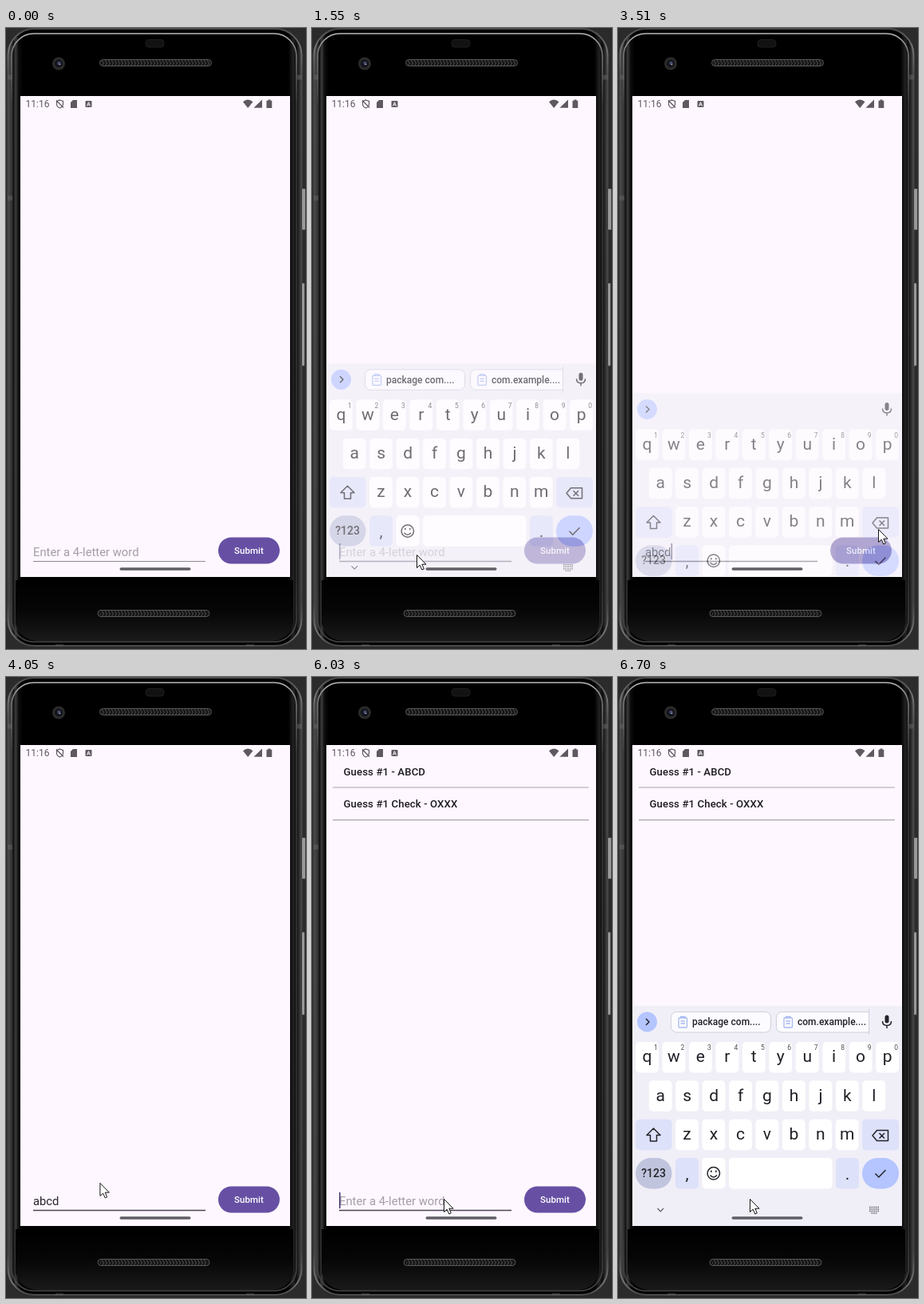
Recreate the animation shown at these times as an HTML page. Size 376x776 px, loop 8 s.

```html
<!DOCTYPE html>
<html lang="en">
<head>
<meta charset="utf-8">
<title>Word guessing app on a phone</title>
<style>
  html, body { margin: 0; width: 100%; height: 100%; overflow: hidden; background: #2b2b2b; }
  svg { display: block; font-family: Roboto, sans-serif; }
  .line { fill: none; stroke: #24242b; stroke-width: 1.5; stroke-linejoin: round; }
  .status { fill: #5d595f; }
  .row { font-size: 13.15px; font-weight: 500; letter-spacing: .0094em; fill: #1d1b20; }
  .field { font-size: 14.8px; }
  .letter { font-size: 21px; fill: #202027; }
  .digit { font-size: 8.5px; fill: #4c4c55; }
  .chip { font-size: 12px; font-weight: 500; fill: #202027; }
  .mid { text-anchor: middle; }
</style>
</head>
<body>
<svg width="376" height="776" viewBox="0 0 376 776">
  <defs>
    <linearGradient id="metal">
      <stop offset="0" stop-color="#4c4c4c"/>
      <stop offset=".012" stop-color="#363636"/>
      <stop offset=".018" stop-color="#101010"/>
      <stop offset=".026" stop-color="#3c3c3c"/>
      <stop offset=".036" stop-color="#0c0c0c"/>
      <stop offset=".05" stop-color="#000"/>
      <stop offset=".955" stop-color="#000"/>
      <stop offset=".972" stop-color="#222"/>
      <stop offset=".982" stop-color="#0c0c0c"/>
      <stop offset="1" stop-color="#484848"/>
    </linearGradient>
    <linearGradient id="rim" x2="0" y2="1">
      <stop offset="0" stop-color="#4a4a4a"/>
      <stop offset=".03" stop-color="#757575"/>
      <stop offset=".08" stop-color="#484848"/>
      <stop offset=".93" stop-color="#404040"/>
      <stop offset=".98" stop-color="#747474"/>
      <stop offset="1" stop-color="#4a4a4a"/>
    </linearGradient>
    <linearGradient id="shine" x2="0" y2="1">
      <stop offset="0" stop-color="#b8b8b8"/>
      <stop offset=".03" stop-color="#7a7a7a"/>
      <stop offset=".12" stop-color="#383838"/>
      <stop offset=".9" stop-color="#303030"/>
      <stop offset="1" stop-color="#484848"/>
    </linearGradient>
    <linearGradient id="foot" x2="0" y2="1">
      <stop offset="0" stop-color="#000"/>
      <stop offset=".5" stop-color="#060606"/>
      <stop offset="1" stop-color="#1a1a1a"/>
    </linearGradient>
    <pattern id="mesh" width="4" height="8" patternUnits="userSpaceOnUse">
      <path d="M0 0L2.500 4L0 8" fill="none" stroke="#505050"/>
    </pattern>
    <clipPath id="screen"><path d="M18 85H356V686H18Z"/></clipPath>
    <clipPath id="strip"><path d="M60 411H314V450H60Z"/></clipPath>
    <clipPath id="pill"><rect x="266" y="636.500" width="77" height="33" rx="16.500"/></clipPath>
  </defs>

  <g id="phone">
    <rect width="376" height="776" fill="#2b2b2b"/>
    <rect x="2.500" y="1" width="368" height="771" rx="33" fill="url(#metal)" stroke="url(#rim)" stroke-width="2"/>
    <path d="M12 690H360V745Q354 765 334 766H40Q18 765 12 745Z" fill="url(#foot)"/>
    <rect x="7" y="7" width="357" height="760" rx="28" fill="none" stroke="url(#shine)" stroke-width="1.600"/>
    <path d="M2 61.500H8M2 212.500H8M365 61.500H371" stroke="#666" stroke-width="6" opacity=".5"/>
    <path d="M62 771.500H72M301 771.500H311" stroke="#555" stroke-width="2"/>
    <g fill="#989898" stroke="#3a3a3a">
      <rect x="370.500" y="200.500" width="5" height="52" rx="1.500"/>
      <rect x="370.500" y="318.500" width="4" height="104" rx="1.500"/>
    </g>
    <rect x="175" y="14.500" width="23" height="9.500" rx="4" fill="#121212" stroke="#1d1d1d"/>
    <circle cx="66" cy="44.500" r="8" fill="#2b2b2b"/>
    <circle cx="66" cy="44.500" r="5" fill="#14141c"/>
    <circle cx="66.500" cy="44" r="2.200" fill="#454b6c"/>
    <circle cx="67.500" cy="45.500" r=".8" fill="#bbc"/>
    <g fill="#161616" stroke="#585858">
      <rect x="117.500" y="39.500" width="140" height="8" rx="4"/>
      <rect x="115" y="727.500" width="140" height="8" rx="4"/>
    </g>
    <path d="M120 40H255V47H120ZM118 728H252V735H118Z" fill="url(#mesh)"/>
  </g>

  <g clip-path="url(#screen)">
    <rect x="18" y="85" width="338" height="601" fill="#fef7ff"/>
    <g class="status">
      <text x="24.500" y="99.300" font-size="12">11:16</text>
      <path d="M67.500 90L71.500 91.500V95Q71.500 98.500 67.500 100Q63.500 98.500 63.500 95V91.500ZM63 90.500L72 99.500" fill="none" stroke="#5d595f" stroke-width="1.200"/>
      <path d="M84 90H89V100H81V93Z"/>
      <rect x="99.500" y="91" width="8" height="8" rx="1"/>
      <path d="M101.500 97.500L103.500 92.700L105.500 97.500M102.300 96H104.700" fill="none" stroke="#fef7ff"/>
      <path d="M297 92.200Q303 87 309.500 92.200L303.200 100Z"/>
      <path d="M321 89.500V99.800H310.500Z"/>
      <path d="M328.500 89.500H331.500V90.700H333.300V100H326.500V90.700H328.500Z"/>
    </g>

    <g id="guesses">
      <text class="row" x="39.500" y="123">Guess #1 - ABCD</text>
      <text class="row" x="39.500" y="163.300">Guess #1 Check - OXXX</text>
      <path d="M26 138H347M26 178.700H347" stroke="#aaa5ad" stroke-width="1.200"/>
    </g>

    <text id="entry" class="field" x="34" y="660"></text>
    <path id="underline" d="M34 666.500H250"/>
    <path id="caret" stroke="#4d426e" stroke-width="1.700"/>
    <rect x="266" y="636.500" width="77" height="33" rx="16.500" fill="#6750a4"/>
    <g clip-path="url(#pill)"><circle id="ripple" cx="300" cy="650" fill="#fff"/></g>
    <text class="mid" x="304.500" y="657.200" font-size="11.500" font-weight="500" letter-spacing=".08" fill="#fff">Submit</text>

    <g id="keyboard"></g>
    <rect x="142.500" y="674.200" width="89" height="3.500" rx="1.750" fill="#625e65"/>
  </g>

  <circle id="press" r="12" fill="#f8ec10" opacity=".66"/>
  <path id="pointer" d="M.5 .5V16.500L4.200 13.200L6.800 19L9.300 17.900L6.800 12.200H12Z" fill="#fff" stroke="#111"/>
</svg>

<script>
const $ = id => document.getElementById(id);
const clamp01 = v => Math.min(1, Math.max(0, v));
const show = (node, on) => node.setAttribute('visibility', on ? 'visible' : 'hidden');

// ---- keyboard ----
const PITCH = 33.45;
const key = (x, y, w, fill = '#fff', r = 5) =>
  `<rect x="${x}" y="${y}" width="${w}" height="38.5" rx="${r}" fill="${fill}"/>`;
const label = (cls, x, y, s) => `<text class="${cls} mid" x="${x}" y="${y}">${s}</text>`;
const line = (d, extra = '') => `<path class="line" d="${d}" ${extra}/>`;

function letterRow(letters, firstCenter, y, digits = '') {
  return [...letters].map((c, i) => {
    const x = firstCenter + i * PITCH;
    return key(x - 14.4, y, 28.8) + label('letter', x, y + 25.3, c) +
      (digits ? label('digit', x + 11, y + 10.3, digits[i]) : '');
  }).join('');
}

function chip(x, text) {
  return `<rect x="${x}" y="418.5" width="125" height="25.5" rx="7" fill="#fcfbff" stroke="#cfd0dc"/>
    <g fill="none" stroke="#a6baf0" stroke-width="1.3">
      <rect x="${x + 9.5}" y="426" width="10.5" height="12" rx="1"/>
      <path d="M${x + 12} 426V424.5H${x + 17.5}V426M${x + 12} 430H${x + 17.5}M${x + 12} 433H${x + 17.5}"/>
    </g>
    <text class="chip" x="${x + 26.5}" y="435.3">${text}</text>`;
}

const SOFT = '#dde1f9', BLUE = '#b4c5ff';
const dots = [0, 1, 2].map(r => `M315 ${662.5 + r * 2.5}H327`).join('');
$('keyboard').innerHTML = `
  <rect x="18" y="411" width="338" height="345" fill="#f0eff7"/>
  <circle cx="36.5" cy="431" r="12.5" fill="${BLUE}"/>
  ${line('M35 427L39 431L35 435')}
  <g id="chips"><g clip-path="url(#strip)">${chip(66.5, 'package com....')}${chip(198.5, 'com.example....')}</g>
    <path d="M314.5 415V447" stroke="#cfd0dc"/></g>
  <rect x="334.5" y="422.5" width="5" height="10" rx="2.5" fill="#24242b"/>
  ${line('M331.5 430Q331.5 435.5 337 435.5Q342.5 435.5 342.5 430M337 435.5V439')}
  ${letterRow('qwertyuiop', 36.5, 456, '1234567890')}
  ${letterRow('asdfghjkl', 53.2, 504.3)}
  ${key(22, 552.7, 45.5, SOFT)}${letterRow('zxcvbnm', 86.5, 552.7)}${key(306, 552.7, 46, SOFT)}
  ${line('M44.5 564L53 572.5H48.5V580H40.5V572.5H36Z')}
  ${line('M324.5 566.5H338.5V579.5H324.5L319 573ZM327.5 570L334 576.5M334 570L327.5 576.5')}
  ${key(22, 601, 45.5, '#c0c4dd', 19.2)}
  <text class="mid" x="44.5" y="625" font-size="14" font-weight="500" fill="#24242b">?123</text>
  ${key(72, 601, 29, SOFT)}${label('letter', 86.5, 628, ',')}
  ${key(105.5, 601, 29)}
  <circle class="line" cx="119.8" cy="620.3" r="7.7"/>
  ${line('M116.8 616.5V619M122.8 616.5V619M115.5 622.5Q119.8 627.5 124 622.5')}
  ${key(139, 601, 129.5)}
  ${key(273, 601, 29, SOFT)}${label('letter', 287.5, 628, '.')}
  ${key(306, 601, 46, BLUE, 19.2)}
  ${line('M322.5 620.5L326.8 625L335.5 616')}
  ${line('M49.5 664L53.3 667.8L57 664', 'style="stroke:#55555e;stroke-width:1.2"')}
  ${line(dots + 'M317.5 670H324.5', 'style="stroke:#66666e;stroke-dasharray:1.6 1"')}`;

// ---- timeline ----
const LOOP = 8000;

// Pointer stops: time, x, y. Repeated positions are rests.
const path = [
  [270, 209, 772], [500, 165, 712], [840, 131, 658], [2400, 131, 658],
  [2430, 142, 652], [2600, 250, 639], [2830, 320, 630], [3160, 320, 630],
  [3330, 326, 626], [3530, 326, 626], [3760, 165, 693], [3940, 56, 668],
  [4050, 117, 632], [4350, 240, 640], [4710, 299, 650], [5250, 299, 650],
  [5600, 250, 655], [5800, 167, 653], [5950, 167, 653], [6030, 165, 652], [LOOP, 165, 652]
];

// Smooth curve through the stops that comes to a halt at each rest.
function pointerAt(t) {
  const i = path.findIndex(p => p[0] > t) - 1;
  if (i < 0) return path[0].slice(1);
  const a = path[i], b = path[i + 1], dt = b[0] - a[0], u = (t - a[0]) / dt;
  const still = (p, q) => !p || !q || (p[1] === q[1] && p[2] === q[2]);
  const slope = (k, axis) => {
    const [p, q, r] = [path[k - 1], path[k], path[k + 1]];
    return still(p, q) || still(q, r) ? 0 : (r[axis] - p[axis]) / (r[0] - p[0]);
  };
  return [1, 2].map(axis =>
    a[axis] * (1 + 2 * u) * (1 - u) ** 2 + b[axis] * u * u * (3 - 2 * u) +
    dt * (slope(i, axis) * u * (1 - u) ** 2 - slope(i + 1, axis) * u * u * (1 - u)));
}

const within = (t, spans) => spans.some(([from, to]) => t >= from && t < to);
const presses = [[1090, 1210], [3160, 3280], [4780, 4900], [6180, 6280]];
const caretOn = [[1200, 1700], [3400, 3900], [4400, 5400], [5960, 6680]];
const SLIDE = 64.3;

function keyboardAt(t) {
  const opening = t >= 6450 ? 6450 : 1430;
  if (t < opening || (t >= 3630 && t < 6450)) return { alpha: 0, drop: SLIDE };
  if (t >= 3410 && t < 3630) {
    const p = (t - 3410) / 220;
    return { alpha: 1 - p, drop: SLIDE * (1 - (1 - p) ** 2) };
  }
  const p = clamp01((t - opening) / 245);
  return { alpha: clamp01(p * 1.3), drop: SLIDE * (1 - p) ** 3 };
}

function render(t) {
  const [x, y] = pointerAt(t);
  $('pointer').setAttribute('transform', `translate(${x} ${y})`);
  show($('pointer'), t >= 270);
  $('press').setAttribute('cx', x);
  $('press').setAttribute('cy', y);
  show($('press'), within(t, presses));

  const submitted = t >= 4900;
  const typed = t >= 3160 && !submitted;
  $('entry').textContent = typed ? 'abcd' : 'Enter a 4-letter word';
  $('entry').setAttribute('fill', typed ? '#29262d' : '#a39da6');
  show($('guesses'), submitted);

  const focused = t >= 1200;
  $('underline').setAttribute('stroke', focused ? '#4b4554' : '#8b868d');
  $('underline').setAttribute('stroke-width', focused ? 1.4 : 1);
  $('caret').setAttribute('d', `M${typed ? 67.3 : 34.8} 644V664`);
  show($('caret'), within(t, caretOn));

  const held = clamp01((t - 4780) / 300);
  $('ripple').setAttribute('r', 70 * held);
  $('ripple').setAttribute('opacity', 0.16 * clamp01((5620 - t) / 450));

  const { alpha, drop } = keyboardAt(t);
  $('keyboard').setAttribute('opacity', alpha);
  $('keyboard').setAttribute('transform', `translate(0 ${drop})`);
  $('chips').setAttribute('opacity', t >= 3200 && t < 4000 ? 0 : 1);
}

function tick() {
  render(performance.now() % LOOP);
  requestAnimationFrame(tick);
}
tick();
</script>
</body>
</html>
```
